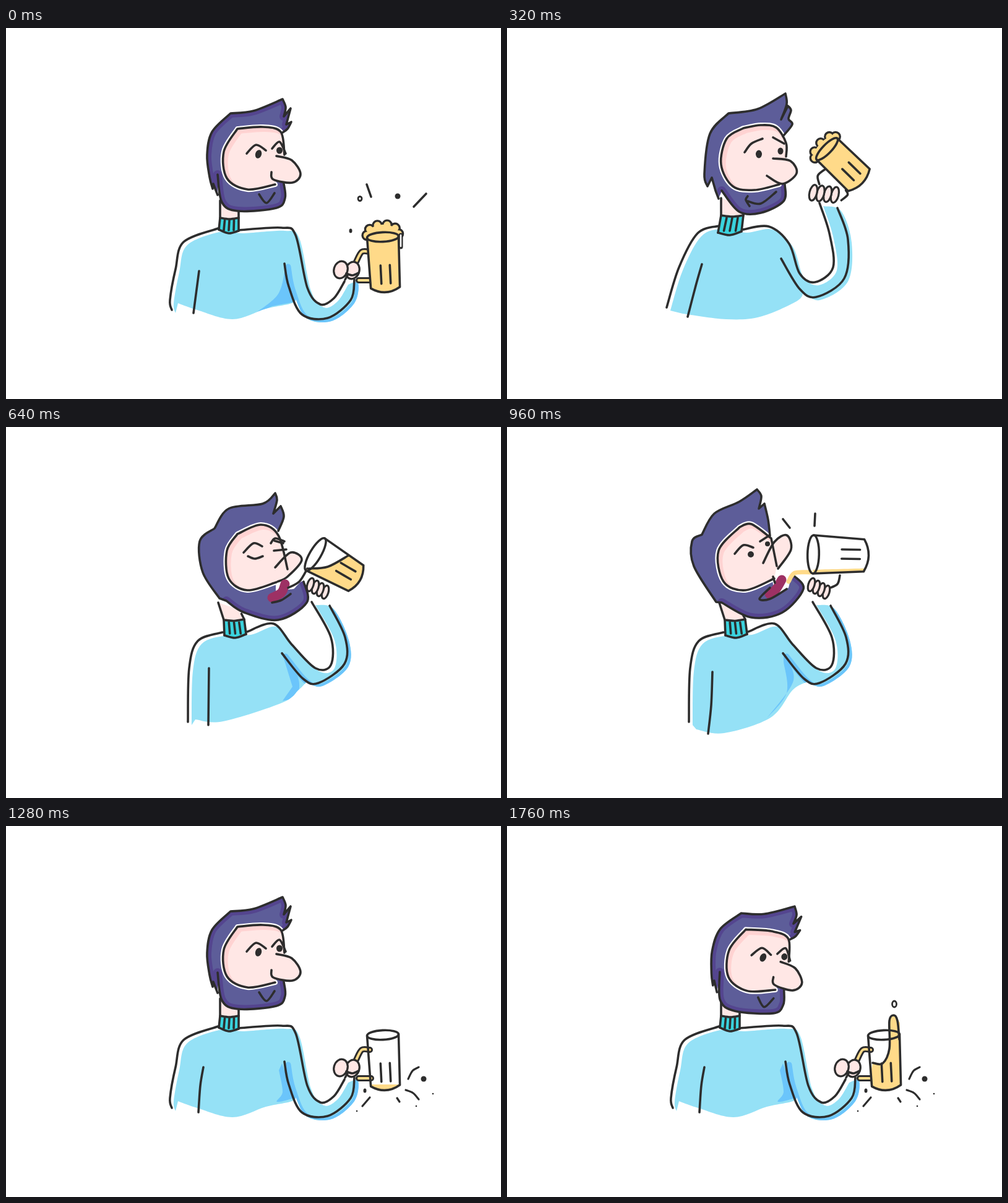
An HTML page with a canvas for the animation above (1920 ms loop, 800x600 px).

```html
<!DOCTYPE html>
<html lang="en">
<head>
<meta charset="utf-8">
<title>Cheers</title>
<style>
html, body { margin: 0; height: 100%; overflow: hidden; background: #fff; }
canvas { display: block; width: 800px; height: 600px; }
</style>
</head>
<body>
<canvas id="stage" width="800" height="600"></canvas>
<script>
const ctx = document.getElementById('stage').getContext('2d');
const INK = '#2d2d2d', HAIR = '#5d5d99', HAIR_DARK = '#54458f', SKIN = '#ffe7e5', BLUSH = '#ffd3d2',
  WOOL = '#95e1f6', WOOL_DARK = '#6bc5fb', TRIM = '#3ad3de', BEER = '#ffda89', WINE = '#9d3164';
const STEP = 160;

// Points form smooth curves; ';' is a corner, '/' lifts the pen.
const pairs = text => text.trim().split(/\s+/).reduce((list, v, i) => {
  i % 2 ? list[list.length - 1].push(+v) : list.push([+v]);
  return list;
}, []);
const reversed = text => pairs(text).reverse().map(p => p.join(' '));
function trace(spec) {
  const path = new Path2D();
  for (const stroke of spec.split('/')) {
    let last = null;
    for (const part of stroke.split(';')) {
      const p = pairs(part);
      last ? p.unshift(last) : path.moveTo(...p[0]);
      for (let i = 0; i + 1 < p.length; i++) {
        const a = p[i - 1] || p[i], b = p[i], c = p[i + 1], d = p[i + 2] || c;
        path.bezierCurveTo(b[0] + (c[0] - a[0]) / 6, b[1] + (c[1] - a[1]) / 6,
          c[0] - (d[0] - b[0]) / 6, c[1] - (d[1] - b[1]) / 6, c[0], c[1]);
      }
      last = p[p.length - 1];
    }
  }
  return path;
}
function fill(spec, color) {
  ctx.fillStyle = color;
  ctx.fill(trace(spec));
}
function line(spec, width = 3.6, color = INK) {
  ctx.strokeStyle = color;
  ctx.lineWidth = width;
  ctx.stroke(trace(spec));
}
function tube(spec, color) {
  line(spec, 10);
  line(spec, 4, color);
}
function oval(x, y, rx, ry, turn = 0, color = INK, edge = 0) {
  ctx.beginPath();
  ctx.ellipse(x, y, rx, ry, turn, 0, Math.PI * 2);
  ctx.fillStyle = color;
  ctx.fill();
  ctx.strokeStyle = INK;
  ctx.lineWidth = edge;
  if (edge) ctx.stroke();
}
const bubble = (x, y, rx = 3.5, ry = 4) => oval(x, y, rx, ry, 0, '#fff', 2.8);
function within(spec, draw) {
  ctx.save();
  ctx.clip(trace(spec));
  draw();
  ctx.restore();
}
function moved(dx, dy, turn, px, py, draw) {
  ctx.save();
  ctx.translate(px + dx, py + dy);
  ctx.rotate(turn);
  ctx.translate(-px, -py);
  draw();
  ctx.restore();
}
const shifted = (dx, dy, draw) => moved(dx, dy, 0, 0, 0, draw);

// The colour of the sweater follows its outline, printed slightly off register.
function body({ left, inner, outer, hem, sleeve, shade }) {
  const wool = left + ' ' + inner + ';' + reversed(outer).slice(0, -1).join(' ') + ';' + hem;
  shifted(6, 5, () => {
    fill(wool, WOOL);
    if (shade) within(wool, () => {
      line(outer, 9, WOOL_DARK);
      shifted(-6, -5, () => fill(shade, WOOL_DARK));
    });
  });
  line(left + '/' + inner + '/' + outer + '/' + sleeve);
}
function collar(x1, y1, x2, y2, x3, y3, x4, y4, ribs, lean = 0) {
  fill(`${x1 - lean} ${y1 - 28};${x2 - lean} ${y2 - 16};${x2} ${y2 + 2};${x1} ${y1 + 2}`, SKIN);
  const edge = `${x1} ${y1} ${(x1 + x2) / 2} ${(y1 + y2) / 2 + 2} ${x2} ${y2}`;
  const hem = `${x3} ${y3} ${(x3 + x4) / 2} ${(y3 + y4) / 2 + 5} ${x4} ${y4}`;
  fill(edge + ';' + hem, TRIM);
  line(`${x1 - lean} ${y1 - 28};${x1} ${y1};${x4} ${y4}/${x2 - lean / 2} ${y2 - 9};${x2} ${y2};${x3} ${y3}`);
  line(edge + '/' + hem);
  for (let i = 1; i <= ribs; i++) {
    const k = i / (ribs + 1);
    line(`${x1 + (x2 - x1) * k} ${y1 + 4};${x4 + (x3 - x4) * k} ${y3 - 1}`);
  }
}
function head({ hair, beard, face, nose, gap, dark }) {
  const mass = hair + (gap ? ';' + gap : '') + ';' + beard;
  fill(mass, HAIR);
  within(mass, () => line(dark ? hair + '/' + beard : beard, 14, HAIR_DARK));
  line(face, 8, '#fff');
  fill(face, SKIN);
  within(face, () => shifted(4, 4, () => line(face, 8, BLUSH)));
  fill(nose, SKIN);
  line(hair + '/' + beard);
  line(face);
  line(nose);
}
function glass(w, base, len) {
  const path = new Path2D();
  path.moveTo(-w, 0);
  path.lineTo(-base, len);
  path.quadraticCurveTo(0, len + 15, base, len);
  path.lineTo(w, 0);
  return path;
}
function foam(w, height, bumps) {
  const cloud = (r, color) => {
    for (let i = 0; i < bumps; i++) {
      const a = Math.PI * (1 + i / (bumps - 1));
      oval(w * Math.cos(a), height * Math.sin(a) - 4, r, r, 0, color);
    }
  };
  cloud(9, INK);
  cloud(5.6, BEER);
  oval(0, -4, w, height, 0, BEER);
}
// Origin at the middle of the rim; the beer shape is given on the stage.
function mug(x, y, turn, len, w, base, beer, bumps = 0, rise = 0) {
  const stage = ctx.getTransform(), shape = glass(w, base, len);
  moved(x, y, turn, 0, 0, () => {
    if (bumps) foam(w, rise, bumps);
    ctx.save();
    ctx.clip(shape);
    ctx.setTransform(stage);
    if (beer) fill(beer, BEER);
    else ctx.fillStyle = BEER, ctx.fillRect(0, 0, 800, 600);
    ctx.restore();
    ctx.strokeStyle = INK;
    ctx.lineWidth = 3.6;
    ctx.stroke(shape);
    ctx.beginPath();
    ctx.ellipse(0, 0, w, w * .3, 0, 0, Math.PI * 2);
    ctx.stroke();
    for (const tick of [-6, 9]) line(`${tick} ${len * .56};${tick} ${len * .92}`);
  });
}
function fingers(x, y, n, dx, dy, rx, ry, turn) {
  for (let i = n - 1; i >= 0; i--) oval(x + i * dx, y + i * dy, rx, ry, turn, SKIN, 3.2);
}

const tablePose = {
  left: '268 456 265 440 274 390 287 346 343 324',
  inner: '376 327 445 323 468 335 487 420 508 447 530 437 547 410',
  outer: '450 381 457 418 478 463 520 469 557 440 563 407',
  hem: '460 438 414 449 360 466 300 450 272 440'
};
function tableBody(sleeve, shade) {
  body({ ...tablePose, sleeve, shade });
  collar(346, 307, 376, 307, 376, 328, 344, 326, 3);
}
const reachBody = () => tableBody('312 393 303 461', '402 462 440 430 452 384;466 443;430 450');
const restBody = () => tableBody('319 390 314 420 311 463', '446 384 466 440;438 446 447 430 441 395');
function liftBody() {
  body({
    left: '261 429 272 375 298 335 338 320',
    inner: '380 325 425 320 452 350 473 407 500 422 522 405 534 318',
    outer: '439 383 460 425 497 452 535 425 550 375 550 325',
    hem: '452 431 380 442 310 445',
    sleeve: '303 392 292 453',
    shade: '437 383 433 410 455 434;316 450;400 444 460 430;460 445 310 460'
  });
  collar(341, 306, 380, 307, 380, 326, 338, 324, 4);
}
function raiseBody() {
  body({
    left: '255 455 275 390 305 335 340 323',
    inner: '378 329 420 324 453 352 470 400 495 414 524 390 518 335 502 286',
    outer: '440 376 470 425 497 438 542 408 548 345 531 294',
    hem: '459 440 400 465 345 469 275 460',
    sleeve: '312 385 302 420 289 470'
  });
  collar(343, 306, 379, 306, 376, 332, 338, 334, 3);
}
function drinkBody(hem, sleeve, shade) {
  body({
    left: '294 477 296 390 310 346 350 332',
    inner: '390 331 432 318 462 352 500 390 525 385 525 340 494 283',
    outer: '446 366 480 407 505 414 547 383 548 340 523 289',
    hem, sleeve, shade
  });
  collar(352, 312, 385, 311, 388, 335, 353, 337, 3, 9);
}
const sipBody = () => drinkBody('467 420 440 441 345 471 300 468', '328 390 327 482',
  '447 368 472 405 470 435 447 443;463 420');
const gulpBody = () => drinkBody('456 420 420 465 345 490 300 484', '332 396 330 450 325 496',
  '447 368 463 410 420 471;452 430 447 380');

function calmHead() {
  head({
    hair: '342 270;335 252;334 260;329 241 325 205 333 168 363 138;400 134 447 115;452 128 449 143;460 130;453 156;461 152;455 163 447 169',
    beard: '449 252 451 275 437 291 375 296 349 282 342 237',
    face: '435 253 390 261 357 243 352 200 374 163;415 160 444 168 450 205',
    nose: '437 207 462 214 476 236 463 250 432 245 429 233',
    dark: true
  });
  line('389 203 404 189 420 198/430 195 442 184 452 203/409 269 421 283 434 267');
  oval(408, 204, 5, 7, .3);
  oval(442, 198, 5, 5.5);
}
function smileHead() {
  head({
    hair: '342 275;337 262;331 241;324 255;319 235 328 170 358 137;405 130 450 105;452 122 443 147;454 125;459 132 455 146 461 155 446 174',
    beard: '449 252 447 279 410 298 375 296 347 262',
    face: '440 252 400 261 365 255 346 220 355 178 382 161;410 156 435 160 451 185 451 207',
    nose: '430 210 458 214 468 234 445 251 420 238'
  });
  line('384 200 395 186 413 178/430 176 448 186/389 271 386 277 392 287/389 279 410 283 435 264');
  oval(407, 203, 5, 6.5);
  oval(442, 198, 4.5, 5.5);
}
function winkHead() {
  head({
    hair: '341 274;335 262;331 271;321 263;324 250 317 185 345 147;363 135 415 128 446 107;452 122 441 150;451 136 458 148 449 172;459 157;459 175 447 181',
    beard: '450 248 452 286 405 306 375 303 341 274',
    face: '430 246 395 257 366 240 363 190 376 167;405 154 440 163 447 200',
    nose: '428 220 460 211 470 233 445 247 432 243'
  });
  line('380 199 403 173 416 186/430 185 438 179 448 188/395 199 403 213 412 199/391 265 376 267 378 280/384 275 397 287 416 276');
  oval(440, 197, 5, 6);
}
function sipHead() {
  head({
    hair: '356 281;345 277;318 235 313 185 337 164;360 132 415 124 435 107;438 118 432 140;444 128;449 145 440 168',
    beard: '481 250 486 284 440 312 385 300 356 281',
    gap: '436 235;436 265;465 262',
    face: '437 251 390 264 360 245 357 200 374 173;412 158 440 175 455 230',
    nose: '435 227 460 203 478 215 455 242 439 250'
  });
  line('451 254 445 268 430 276', 15, WINE);
  line('384 203 400 188 414 193/391 209 402 213 415 209/428 188 435 180 450 185/434 184 448 188/433 200 453 198/430 284 445 280 460 270/456 260 474 250 487 229');
}
function gulpHead() {
  head({
    hair: '347 284;338 283;302 225 299 185 315 174;335 140 375 121 404 101;411 112 407 132;416 124;422 150 425 176',
    beard: '463 240 479 262 445 300 395 308 347 284',
    gap: '430 255;440 270;455 260',
    face: '432 245 385 264 350 250 342 200 376 162;395 157 427 180;436 225',
    nose: '414 220 432 186 452 175 459 198 438 229'
  });
  line('444 247 435 262 424 270', 15, WINE);
  line('368 205 382 191 398 195/409 185 423 176/425 260 408 278 425 278 452 262/430 242 433 252');
  oval(394, 206, 5, 5);
  oval(421, 189, 4, 4);
}
const nod = () => moved(0, 0, .14, 349, 250, calmHead);

const DREGS = '570 418;650 418;650 440;570 440';
function tableMug(beer, bumps, rise) {
  tube('588 362 575 362 566 378/570 408 590 408', BEER);
  mug(609, 338, -.05, 82, 25.5, 23.5, beer, bumps, rise);
  fingers(541, 391, 2, 19, 1, 11, 14, .3);
  line('550 397 560 400 570 396/548 407 553 398');
}
function liftMug() {
  tube('552 277 544 281 544 290', '#fff');
  mug(572, 243, -.08, 103, 22, 21, '', 6, 20);
  line('597 238 600 276', 8);
  line('596 240 598 268', 3, BEER);
  oval(548, 307, 13, 18, 0, SKIN, 3.2);
  fingers(535, 297, 3, 4, 8, 12, 6, -.3);
}
function raiseMug() {
  mug(533, 200, -.55, 72, 24, 25, '', 5, 10);
  line('522 231 508 238 507 252/535 286 547 280 546 272');
  fingers(494, 263, 4, 11, 4, 6, 13, .5);
}
function sipMug() {
  mug(500, 206, -1.04, 76, 30, 24, '485 230 520 226 553 208;620 208;620 300;485 300');
  line('489 229 520 226 553 208');
}
function gulpMug() {
  line('455 250 465 236 490 235', 7, BEER);
  mug(495, 206, -1.55, 82, 31, 26, '485 231;600 228;600 250;485 250');
  line('538 240 534 254 520 261');
}
const drinkHand = () => fingers(492, 255, 4, 8, 4, 5, 11, .3);

function table(face, beer) {
  restBody();
  face();
  tableMug(beer);
  line('576 453 588 439/646 427 658 432 667 442/632 440 636 446/650 409 657 396 667 390', 3.2);
  oval(675, 409, 4.5, 4.5);
  oval(580, 428, 2.5, 3.5);
  for (const [x, y] of [[567, 461], [663, 453], [690, 433]]) oval(x, y, 1.3, 1.3);
}
function splash(face, ...drops) {
  table(face, '580 402 610 400 640 395;640 440;580 440');
  line('590 402 605 403 634 396');
  for (const [x, y] of drops) bubble(x, y);
}

const scenes = [
  () => {
    reachBody();
    calmHead();
    tableMug('', 6, 16);
    line('638 335;638 354', 7);
    line('638 335;638 353', 2.5, '#fff');
    line('583 253 590 273/659 289 679 268');
    bubble(572, 276, 3, 3.5);
    oval(633, 272, 4.5, 4.5);
    oval(557, 328, 2.5, 3.5);
  },
  () => {
    liftBody();
    smileHead();
    liftMug();
    line('543 188 547 196/616 225 637 205');
    oval(590, 195, 4.5, 4.5);
    bubble(519, 226, 3, 3.5);
  },
  () => {
    shifted(3, -3, raiseBody);
    shifted(0, 1, smileHead);
    moved(2, -2, -.25, 515, 270, raiseMug);
  },
  () => {
    raiseBody();
    winkHead();
    raiseMug();
    line('507 158 517 172/564 155 557 172', 3);
    oval(611, 247, 4, 5.5);
    oval(576, 288, 4, 5.5);
  },
  () => {
    sipBody();
    sipHead();
    sipMug();
    drinkHand();
  },
  () => {
    gulpBody();
    moved(0, 5, -.08, 370, 290, sipHead);
    moved(0, 0, -.2, 500, 235, sipMug);
    drinkHand();
    line('598 186 612 178/602 212 613 214');
  },
  () => {
    gulpBody();
    gulpHead();
    gulpMug();
    drinkHand();
    line('446 149 457 163/498 140 497 160');
  },
  () => shifted(-8, 6, () => {
    reachBody();
    calmHead();
    moved(0, 0, .12, 555, 392, () => tableMug(DREGS));
  }),
  () => table(calmHead, DREGS),
  () => splash(calmHead, [614, 305]),
  () => splash(nod, [600, 222], [618, 262]),
  () => {
    const jet = '591 383 607 384 618 360 618 315 625 306 631 315 634 345';
    fill('618 345;618 315 625 306 635 318;634 345', BEER);
    table(nod, jet + ';650 440;580 440');
    line(jet);
    bubble(626, 288, 3.5, 5);
  }
];

let shown = -1;
function tick() {
  const i = Math.floor((performance.now() - start) / STEP) % scenes.length;
  if (i !== shown) {
    shown = i;
    ctx.fillStyle = '#fff';
    ctx.fillRect(0, 0, 800, 600);
    scenes[i]();
  }
  requestAnimationFrame(tick);
}
ctx.lineCap = ctx.lineJoin = 'round';
const start = performance.now();
tick();
</script>
</body>
</html>
```
